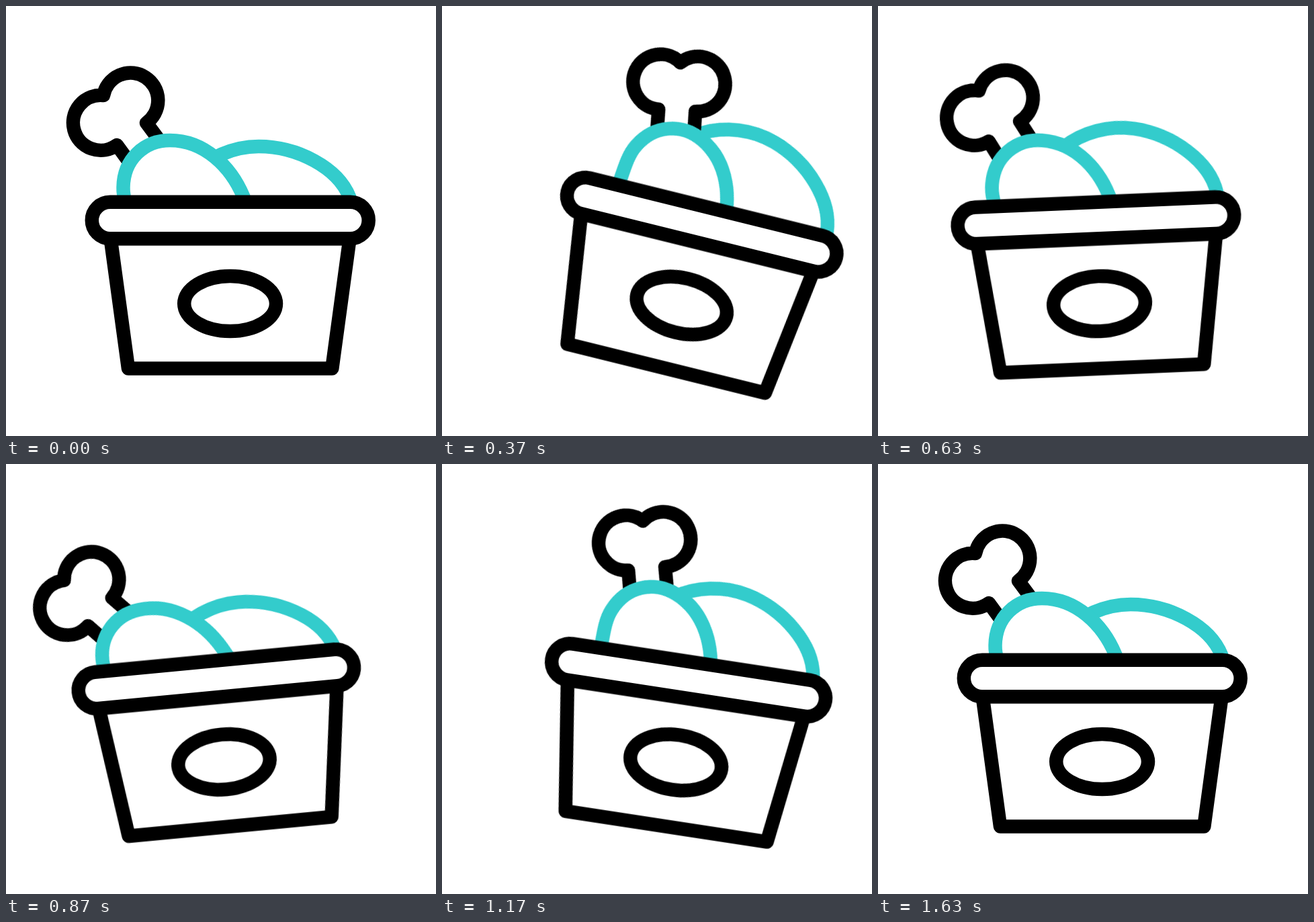
Write an HTML page that moves like this. It is 640 px wide and 640 px high and loops after 2000 ms.

```html
<!DOCTYPE html>
<html lang="en">
<head>
<meta charset="utf-8">
<title>Chicken bucket</title>
<style>
  html, body { margin: 0; width: 100%; height: 100%; overflow: hidden; background: #fff; }
  svg { display: block; width: 100vw; height: 100vh; }
  .line { fill: #fff; stroke: #000; stroke-width: 20.5; stroke-linejoin: round; }
  .meat { stroke: #33cccc; }
  .swing {
    transform-box: view-box;
    animation: 2s cubic-bezier(.37, 0, .63, 1) infinite;
  }
  .bucket { transform-origin: 333.5px 539.5px; animation-name: bucket; }
  .drumstick { transform-origin: 281.5px 326.3px; animation-name: drumstick; }
  .thigh { transform-origin: 512px 305px; animation-name: thigh; }

  @keyframes bucket {
    0%, 76.667%, 100% { transform: rotate(0deg); }
    18.333% { transform: rotate(13.9deg); }
    38.333% { transform: rotate(-8.05deg); }
    58.333% { transform: rotate(8.7deg); }
  }
  @keyframes drumstick {
    0%, 80%, 100% { transform: rotate(0deg); }
    21.667% { transform: rotate(27.7deg); }
    40% { transform: rotate(-10deg); }
    58.333% { transform: rotate(22.8deg); }
  }
  @keyframes thigh {
    0%, 1.667%, 41.667%, 81.667%, 100% { transform: rotate(0deg); }
    23.333% { transform: rotate(18.8deg); }
    60% { transform: rotate(13.3deg); }
  }
</style>
</head>
<body>
<svg viewBox="0 0 640 640">
  <g class="swing bucket">
    <path class="line meat swing thigh"
      d="M276 252 C300 226 338 209 376 209 C434 209 494 241 511 284 L517 302"/>
    <g class="swing drumstick">
      <path class="line"
        d="M184 233 L165 207 A41 41 0 1 1 145 133 A41 41 0 1 1 209 174 L235 209"/>
      <path class="line meat"
        d="M196 340 L189 323 C181 303 174 286 174.5 270 C175 228 206 200 244 200
           C296 200 335 240 353 283 L370 325"/>
    </g>
    <path class="line" d="M155.6 346 L182 539.5 H485.3 L511.6 346 Z"/>
    <rect class="line" x="127.8" y="291.8" width="411.9" height="54.4" rx="27.2"/>
    <ellipse class="line" cx="333.6" cy="443" rx="68.4" ry="41"/>
  </g>
</svg>
</body>
</html>
```
